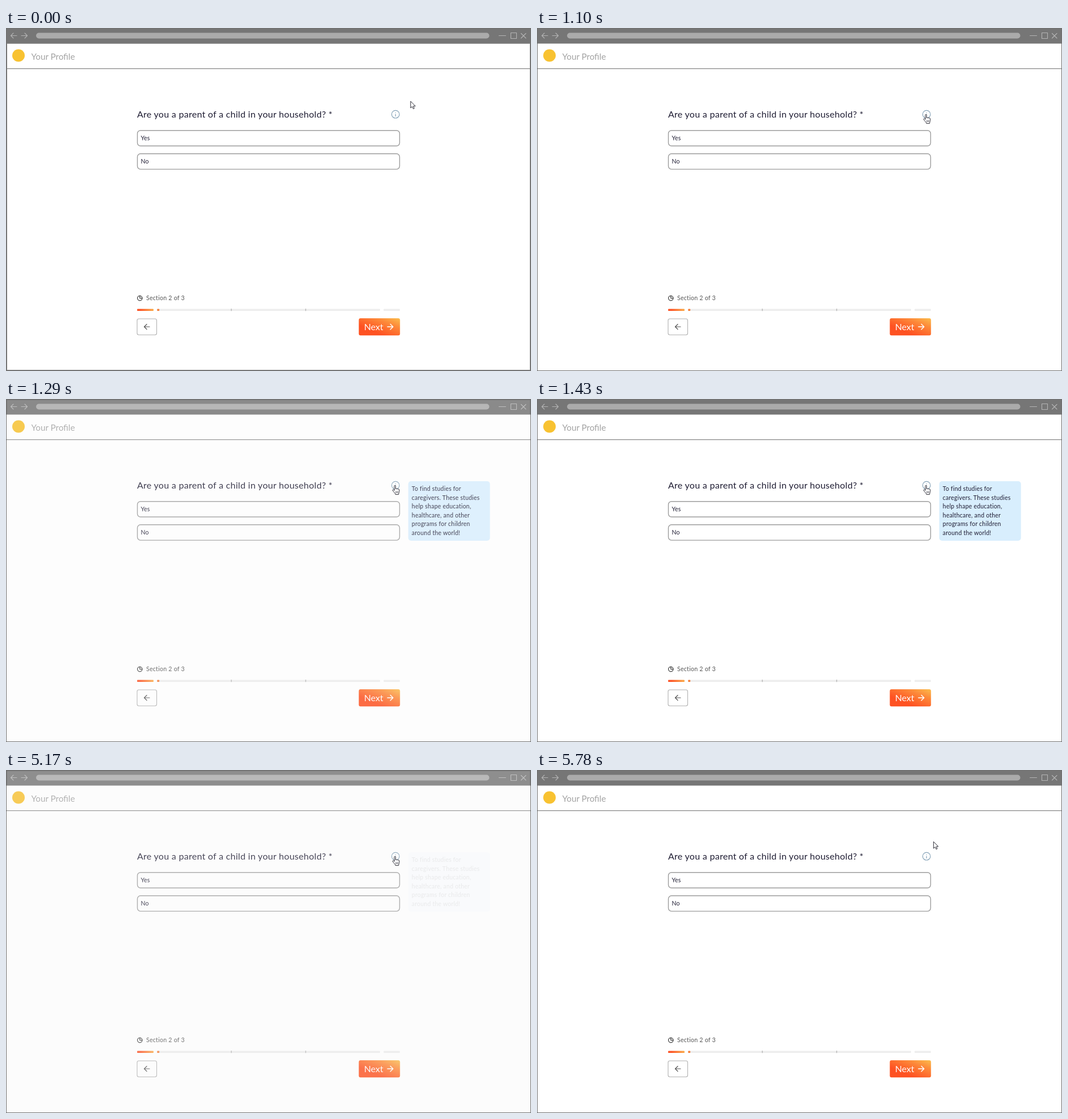
Write an HTML page that moves like this. It is 925 px wide and 605 px high and loops after 5.98 s.

```html
<!DOCTYPE html>
<html lang="en">
<head>
<meta charset="utf-8">
<title>Your Profile</title>
<style>
  html, body { margin: 0; width: 100%; height: 100%; overflow: hidden; background: #fff; }
  svg { display: block; width: 925px; height: 605px; }
  text { font-family: Lato, "Open Sans", sans-serif; fill: #1f1d33; }
  .line { fill: none; stroke-linecap: round; stroke-linejoin: round; }
  .small { font-size: 10.5px; letter-spacing: .22px; }
</style>
</head>
<body>
<svg viewBox="0 0 925 605">
  <defs>
    <linearGradient id="btn" x1="0" y1="1" x2="1" y2="0">
      <stop offset=".3" stop-color="#fe5222"/>
      <stop offset=".72" stop-color="#fd8a3a"/>
      <stop offset="1" stop-color="#fbbd4c"/>
    </linearGradient>
    <linearGradient id="done">
      <stop offset=".2" stop-color="#fc5426"/>
      <stop offset="1" stop-color="#fbab48"/>
    </linearGradient>
  </defs>

  <rect width="925" height="605" fill="#fff"/>

  <!-- window bar -->
  <rect width="925" height="27.5" fill="#767676"/>
  <rect x="53" y="8.5" width="798.5" height="10" rx="5" fill="#ababab"/>
  <g class="line" stroke="#b4b4b4" stroke-width="1.1">
    <path d="M19 13.5H8.5M13 9L8.5 13.5L13 18M27 13.5H37.5M33 9L37.5 13.5L33 18"/>
    <path d="M868.5 13.5H880.5M889.5 8.5H899.5V18.5H889.5ZM907.5 9.5L916 18M916 9.5L907.5 18"/>
  </g>

  <!-- page header -->
  <circle cx="22" cy="48.5" r="11" fill="#f8c231"/>
  <text x="44.5" y="55.8" font-size="15.2" style="fill:#a3a3a3">Your Profile</text>
  <rect x="1" y="71" width="923" height="1.3" fill="#8c8c8c"/>

  <!-- question -->
  <text x="231" y="157.8" font-size="16" letter-spacing=".28">Are you a parent of a child in your household? *</text>
  <g class="line" stroke="#86a3b8" stroke-width="1.2">
    <circle cx="686.3" cy="152.2" r="6.8"/>
    <path d="M686.3 152V155.4M686.3 149.3V149.4"/>
  </g>
  <g fill="#fff" stroke="#9c9c9c" stroke-width="1.4">
    <rect x="231.5" y="180.7" width="462" height="27.3" rx="5.5"/>
    <rect x="231.5" y="221.8" width="462" height="27.3" rx="5.5"/>
  </g>
  <text class="small" x="237.4" y="198">Yes</text>
  <text class="small" x="237.4" y="239">No</text>

  <!-- progress -->
  <g class="line" stroke="#444" stroke-width="1.3">
    <circle cx="235.8" cy="476.6" r="4.2"/>
    <path d="M235.8 472.6V476.6H239.8"/>
  </g>
  <text x="247" y="480.2" font-size="10.6" letter-spacing=".25" style="fill:#555">Section 2 of 3</text>
  <g fill="#ededed">
    <rect x="266" y="495.5" width="393" height="3.5" rx="1"/>
    <rect x="665.3" y="495.5" width="28.7" height="3.5" rx="1"/>
  </g>
  <rect x="231" y="495.5" width="29" height="3.5" rx="1" fill="url(#done)"/>
  <rect x="266.2" y="495.5" width="4" height="3.5" rx="1" fill="#f5813f"/>
  <path d="M397 495V499.2M528 495V499.2" stroke="#a2a2a2"/>

  <!-- buttons -->
  <rect x="231" y="513" width="34.5" height="28.3" rx="3" fill="#fff" stroke="#b0b0b0" stroke-width="1.1"/>
  <path class="line" d="M253 527H243.5M248 522.5L243.5 527L248 531.5" stroke="#555" stroke-width="1.2"/>
  <rect x="621.6" y="512" width="72.6" height="30.2" rx="3" fill="url(#btn)"/>
  <text x="631" y="532.7" font-size="15.8" style="fill:#fff">Next</text>
  <path class="line" d="M672 527H682M677.2 522.2L682 527L677.2 531.8" stroke="#fff" stroke-width="1.4"/>

  <rect id="veil" x="2" y="2" width="921" height="601" fill="#f0f0f0" opacity="0"/>

  <g id="tip" opacity="0">
    <rect x="708.7" y="145" width="144" height="105" rx="5" fill="#d8eefd"/>
  </g>

  <rect x=".5" y=".5" width="924" height="604" fill="none" stroke="#6f6f6f"/>
  <rect id="inner" x="1.5" y="27" width="922" height="576.5" fill="none" stroke="#7c7c7c"/>

  <g class="line" stroke="#2c2c36" stroke-width="1">
    <path id="arrow" style="fill:#fff" d="M0 0V11.4L2.8 9L4.6 13L6.5 12.2L4.8 8.2H8Z"/>
    <g id="hand">
      <path style="fill:#fff" d="M-1.1 1.2a1.2 1.2 0 0 1 2.4 0V6.2c.4-1 2.1-.8 2.2.3c.4-.9 2.1-.7 2.2.4c.5-.8 2-.5 2 .8V11c0 2-1.2 2.6-1.3 5H1C.8 14-1.5 12.2-3.6 9.4C-4.8 7.6-2.8 6.6-1.1 8.6Z"/>
      <path d="M1.6 10.5V13.3M3.5 10.5V13.3M5.4 10.5V13.3" stroke-width=".7"/>
    </g>
  </g>
</svg>
<script>
const LOOP = 5980;
const $ = id => document.getElementById(id);
const veil = $('veil'), tip = $('tip'), inner = $('inner'), arrow = $('arrow'), hand = $('hand');

const LINES = ['To find studies for', 'caregivers. These studies', 'help shape education,',
  'healthcare, and other', 'programs for children', 'around the world!'];
LINES.forEach((line, i) => {
  const el = document.createElementNS('http://www.w3.org/2000/svg', 'text');
  el.setAttribute('class', 'small');
  el.setAttribute('x', 714.8);
  el.setAttribute('y', 162.3 + i * 15.45);
  el.textContent = line;
  tip.append(el);
});

// Each phase advances in n discrete steps, the first at a and the last at b.
const PHASE = { enter: [50, 590, 11], show: [1050, 1430, 8], hide: [5020, 5320, 7], leave: [5560, 5780, 5] };
const stepOf = (t, [a, b, n]) =>
  t < a ? 0 : Math.min(n, 1 + Math.floor((t - a + 2) / (b - a) * (n - 1)));

const SHOW = { tip: [0, 0, 0, .38, .62, .82, .93, .98, 1], veil: [0, 0, 0, .2, .24, .16, .07, .02, 0] };
const HIDE = { tip: [1, .88, .6, .28, .08, .02, 0, 0], veil: [0, .09, .2, .25, .2, .1, .03, 0] };

const START = [712.9, 129.6], ICON = [685.2, 152.4], END = [698.7, 126.8];
const mix = (a, b, p) => a.map((v, i) => v + (b[i] - v) * p);
const easeInOut = p => p * p * (3 - 2 * p);
const easeOut = p => 1 - (1 - p) ** 2;

function cursorAt(t) {
  if (t < PHASE.leave[0]) return mix(START, ICON, easeInOut(stepOf(t, PHASE.enter) / PHASE.enter[2]));
  return mix(ICON, END, easeOut(stepOf(t, PHASE.leave) / PHASE.leave[2]));
}

function draw(t) {
  const fade = t < PHASE.hide[0] ? SHOW : HIDE;
  const k = stepOf(t, fade === SHOW ? PHASE.show : PHASE.hide);
  tip.setAttribute('opacity', fade.tip[k]);
  veil.setAttribute('opacity', fade.veil[k]);
  inner.setAttribute('visibility', t < PHASE.enter[0] ? 'visible' : 'hidden');

  const [x, y] = cursorAt(t);
  const over = Math.hypot(x - 686.3, y - 152.2) < 7.5;
  hand.setAttribute('visibility', over ? 'visible' : 'hidden');
  arrow.setAttribute('visibility', over ? 'hidden' : 'visible');
  for (const el of [hand, arrow]) el.setAttribute('transform', `translate(${x} ${y})`);
}

const t0 = performance.now();
function tick() {
  draw((performance.now() - t0) % LOOP);
  requestAnimationFrame(tick);
}
tick();
</script>
</body>
</html>
```
